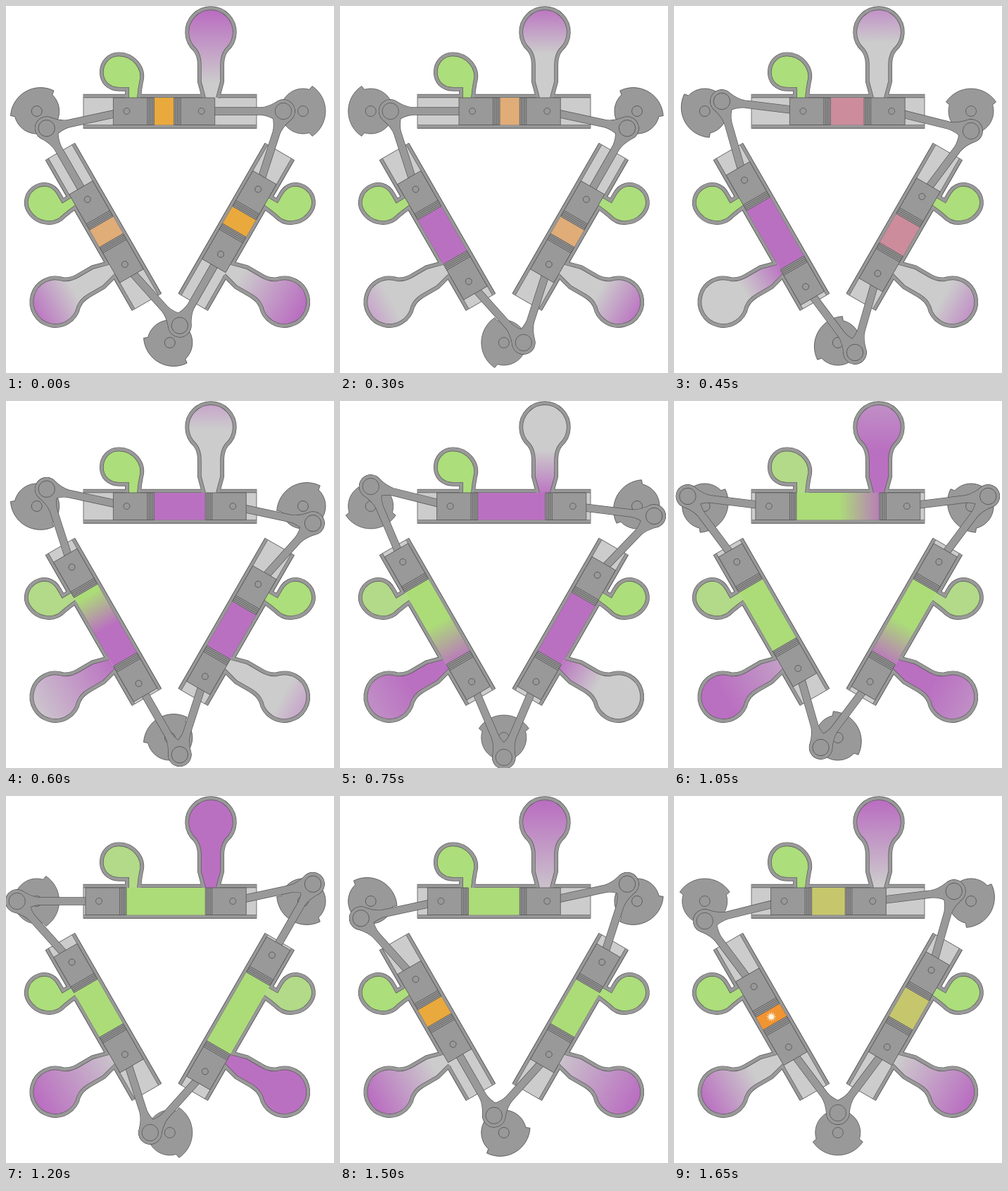
Animation of 466x520 px, one loop 1.8 s. Source, as an HTML page with a canvas:

```html
<!DOCTYPE html>
<html lang="en">
<head>
<meta charset="utf-8">
<title>Opposed-piston delta engine</title>
<style>
html, body { margin: 0; width: 100%; height: 100%; overflow: hidden; background: #fff; }
canvas { display: block; }
</style>
</head>
<body>
<canvas id="stage" width="466" height="520"></canvas>
<script>
const ctx = document.getElementById('stage').getContext('2d');
const STEP = 150, STEPS = 12;
const METAL = '#999', LINE = '#555', EMPTY = '#ccc';
const SPENT = '#ba70c1', FRESH = '#acdc78';
const THROW = 28, ROD = 116.3, CROWN = 39, SKIRT = 19;
const TOP = 130, BOTTOM = 168.5, MID = 149;
const RAD = Math.PI / 180;

// angle at time zero and direction of rotation
const cranks = [
  { x: 43.7, y: MID, start: 60, spin: -1 },
  { x: 422, y: MID, start: 180, spin: -1 },
  { x: 232.8, y: 477, start: -60, spin: 1 }
];

// intake crank, exhaust crank, steps ahead in the cycle, mirroring
const cylinders = [
  { a: 0, b: 1, lead: 0, flip: 1 },
  { a: 0, b: 2, lead: 2, flip: -1 },
  { a: 1, b: 2, lead: 0, flip: 1 }
];

// per step: charge (one colour, or two with a span) and exhaust gradient
const cycle = [
  { gas: '#e9a93c', out: [SPENT, 10, EMPTY, 110] },
  { gas: '#f19432', out: [SPENT, 5, EMPTY, 88], spark: true },
  { gas: '#e0ac78', out: [SPENT, 0, EMPTY, 68] },
  { gas: '#cc8c9c', out: ['#c08bc6', 0, EMPTY, 52] },
  { gas: SPENT, out: ['#c79fcb', 0, EMPTY, 40] },
  { gas: SPENT, out: [EMPTY, 70, SPENT, 135] },
  { gas: [FRESH, 190, SPENT, 243], out: ['#ccc4cd', 5, SPENT, 135], flow: true },
  { gas: [FRESH, 235, SPENT, 300], out: ['#c08fc6', 5, SPENT, 70], flow: true },
  { gas: FRESH, out: [SPENT, 0, SPENT, 130], flow: true },
  { gas: FRESH, out: [SPENT, 40, '#c4a8c8', 150], flow: true },
  { gas: FRESH, out: [SPENT, 10, EMPTY, 145] },
  { gas: '#c6c76c', out: [SPENT, 10, EMPTY, 128] }
];

const intake = new Path2D('M172 130V117.8H161C145 117.8 135.8 107 135.8 94C135.8 79 147 68.3 160 68.3C181 68.3 198 88 192 108Q190 118 189 130');
const exhaust = new Path2D('M281 130L274.8 107V82Q274.5 70 268.4 62.1A33.8 33.8 0 1 1 313.6 62.1Q307.5 70 307.2 82V107L301 130');
const walls = new Path2D('M110 127.6H172M189 127.6H281M301 127.6H356M110 170.8H356');
const web = new Path2D('M-13 -35.5A42.7 42.7 0 0 0 -13 35.5L-9 30.7A32 32 0 1 0 -9 -30.7Z');
const rod = new Path2D('M9 13.2A16 16 0 1 1 9 -13.2Q22 -5.5 32 -5H116V5H32Q22 5.5 9 13.2Z');

function dot(x, y, r) {
  ctx.beginPath();
  ctx.arc(x, y, r, 0, 2 * Math.PI);
  ctx.stroke();
}

function blend([from, start, to, end], vertical) {
  const g = vertical ? ctx.createLinearGradient(0, start, 0, end)
                     : ctx.createLinearGradient(start, 0, end, 0);
  g.addColorStop(0, from);
  g.addColorStop(1, to);
  return g;
}

function at(x, y, angle, draw) {
  ctx.save();
  ctx.translate(x, y);
  ctx.rotate(angle);
  draw();
  ctx.restore();
}

// draws in the frame of the top cylinder
function inCylinder(c, draw) {
  const a = cranks[c.a], b = cranks[c.b];
  at(a.x, a.y, Math.atan2(b.y - a.y, b.x - a.x), () => {
    ctx.scale(1, c.flip);
    ctx.translate(-cranks[0].x, -MID);
    draw();
  });
}

// crank pin position, piston distance and rod tilt
function linkage(angle, from, to) {
  const dx = to.x - from.x, dy = to.y - from.y, d = Math.hypot(dx, dy);
  const qx = THROW * Math.cos(angle), qy = THROW * Math.sin(angle);
  const along = (qx * dx + qy * dy) / d;
  const across = (qx * dy - qy * dx) / d;
  const reach = along + Math.sqrt(ROD * ROD - across * across);
  return {
    x: from.x + qx, y: from.y + qy, reach,
    tilt: Math.atan2(reach * dy / d - qy, reach * dx / d - qx)
  };
}

function drawSpark(x) {
  ctx.fillStyle = '#fff6e4';
  ctx.beginPath();
  for (let i = 0; i < 24; i++) {
    const r = i % 2 ? 3 : 7.5, a = i * 15 * RAD;
    ctx.lineTo(x + r * Math.cos(a), MID + r * Math.sin(a));
  }
  ctx.fill();
}

function drawCylinder(state, left, right) {
  ctx.fillStyle = EMPTY;
  ctx.fillRect(110, TOP, 246, BOTTOM - TOP);
  ctx.strokeRect(110, 125.2, 246, 48);

  ctx.fillStyle = state.flow ? '#b2da88' : '#acde7b';
  ctx.fill(intake);
  ctx.fillStyle = blend(state.out, true);
  ctx.fill(exhaust);

  for (const [color, extra] of [[LINE, 1.3], [METAL, 0]]) {
    ctx.strokeStyle = color;
    ctx.lineWidth = 4.4 + extra;
    ctx.stroke(intake);
    ctx.stroke(exhaust);
    ctx.lineWidth = 4 + extra;
    ctx.stroke(walls);
  }

  const start = left + CROWN, end = right - CROWN;
  ctx.fillStyle = Array.isArray(state.gas) ? blend(state.gas) : state.gas;
  ctx.fillRect(start, TOP, end - start, BOTTOM - TOP);
  if (state.spark) drawSpark((start + end) / 2);
}

function drawPiston(x, side) {
  ctx.save();
  ctx.translate(x, 0);
  ctx.scale(side, 1);
  ctx.fillStyle = METAL;
  ctx.beginPath();
  ctx.rect(-SKIRT, TOP, SKIRT + CROWN, BOTTOM - TOP);
  ctx.fill();
  for (let i = 0; i < 4; i++) {
    ctx.moveTo(29.5 + i * 2.4, TOP);
    ctx.lineTo(29.5 + i * 2.4, BOTTOM);
  }
  ctx.stroke();
  dot(0, MID, 4.5);
  ctx.restore();
}

function render(step) {
  ctx.clearRect(0, 0, 466, 520);
  ctx.lineWidth = 0.8;
  ctx.strokeStyle = LINE;
  const angles = cranks.map(c => (c.start + c.spin * step * 360 / STEPS) * RAD);

  const rods = [];
  for (const c of cylinders) {
    const a = linkage(angles[c.a], cranks[c.a], cranks[c.b]);
    const b = linkage(angles[c.b], cranks[c.b], cranks[c.a]);
    c.left = cranks[0].x + a.reach;
    c.right = cranks[1].x - b.reach;
    rods.push(a, b);
    inCylinder(c, () => drawCylinder(cycle[(step + c.lead) % STEPS], c.left, c.right));
  }

  ctx.fillStyle = METAL;
  cranks.forEach((c, i) => at(c.x, c.y, angles[i], () => {
    ctx.fill(web);
    ctx.stroke(web);
    dot(0, 0, 7.5);
  }));

  // outlines first, so that the two rods on a pin merge
  ctx.lineWidth = 1.4;
  rods.forEach(r => at(r.x, r.y, r.tilt, () => ctx.stroke(rod)));
  rods.forEach(r => at(r.x, r.y, r.tilt, () => ctx.fill(rod)));
  ctx.lineWidth = 0.8;
  cranks.forEach((c, i) => at(c.x, c.y, angles[i], () => dot(THROW, 0, 11.7)));

  for (const c of cylinders) {
    inCylinder(c, () => {
      drawPiston(c.left, 1);
      drawPiston(c.right, -1);
    });
  }
}

function tick() {
  render(Math.floor(performance.now() / STEP) % STEPS);
  requestAnimationFrame(tick);
}
tick();
</script>
</body>
</html>
```
